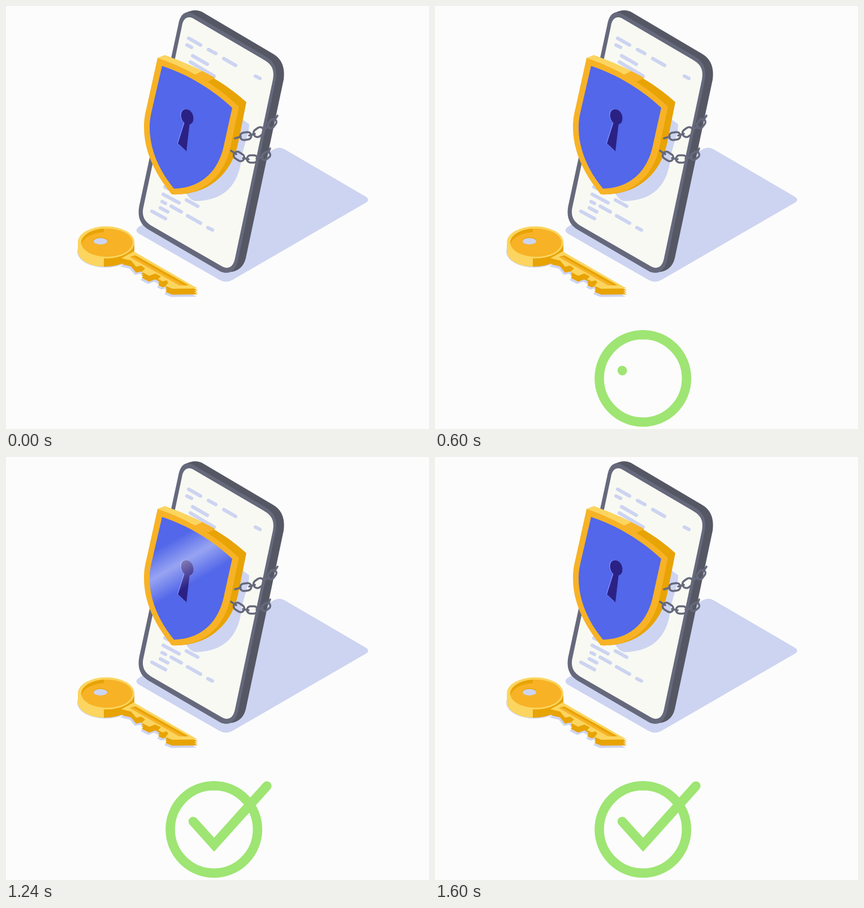
These frames come from a looping animation (748 by 748 pixels, 9.96 s). An HTML page:

```html
<!DOCTYPE html>
<html lang="en">
<head>
<meta charset="utf-8">
<title>Secured phone</title>
<style>
  html, body { margin: 0; width: 100%; height: 100%; overflow: hidden; background: #fcfcfc; }
  svg { display: block; width: 100vw; height: 100vh; }
  .pale { fill: #cdd4f1; }
  .gold { fill: #f7b226; }
  .dark { fill: #e8a305; }
  .light { fill: #fbd55f; }
  .lines { fill: none; stroke: #cdd4f1; stroke-width: 6.2; stroke-linecap: round; }
  .chain { fill: none; stroke: #66697b; stroke-width: 3.6; stroke-linecap: round; }
  .green { fill: none; stroke: #9ee573; stroke-width: 16.6; }
</style>
</head>
<body>
<svg viewBox="0 0 748 748">
  <defs>
    <path id="face" d="M276 106C322 121 366 148 400 180L386 243C377 292 345 322 297 323C270 290 254 253 254 214C254 202 256 193 258 184Z"/>
    <clipPath id="faceClip"><use href="#face"/></clipPath>
    <linearGradient id="glow" x2="0" y2="1">
      <stop offset="0" stop-color="#fff" stop-opacity="0"/>
      <stop offset=".5" stop-color="#fff" stop-opacity=".4"/>
      <stop offset="1" stop-color="#fff" stop-opacity="0"/>
    </linearGradient>
    <path id="blade" d="M226 434L339 499.500L294 500L282 495L287 489L284 485L277 487L269 483L274 478L264 473L253 477L240 470L246 464L239 459L230 461L226 456L221 450L204 446Z"/>
    <ellipse id="bow" cx="177" cy="418" rx="50" ry="28.500"/>
    <g id="keyhole">
      <ellipse cx="320.500" cy="196" rx="10.500" ry="14" transform="rotate(-22 320.500 196)"/>
      <path d="M316 205L304 243L319 257L325 206Z"/>
    </g>
  </defs>

  <path class="pale" d="M234 402Q227 397 234 391L474 253Q483 248 492 253L636 337Q645 343 636 348L401 484Q389 491 377 484Z"/>

  <!-- phone -->
  <path fill="#555864" d="M318 12Q334 4 346 10L473 85Q495 98 491 130L424 446Q419 466 400 470L385 471Z"/>
  <path fill="#66697c" d="M304.500 34C308 14 317 7 331 14L458 88.500C474 98 480 108 477 130L411 446C407 467 397 476 380 470L253 396C238 387 232 374 235.500 354Z"/>
  <path fill="#f8f9f3" d="M311 36C313 22 321 17 331 22L455 94.500C470 103 475 112 472 130L405 446C402 461 394 466 383 461L258 389C246 382 240 373 242.500 358Z"/>
  <path class="lines" d="M323 57l21 12M320 69l8 4M358 77l13 7M385 93l21 12M441 124l8 4M330 88l26 15M326 99l42 25M281 320l6 3M278 333l28 15M319 343l20 11M276 346l6 3M292 354l18 10M273 357l13 7M258 363l24 13M321 371l23 13M357 392l8 4"/>
  <path class="pale" d="M318 330Q326 345 336 345C386 344 413 316 417 264C424 237 430 225 430 209L416 199Z"/>

  <!-- shield -->
  <path class="dark" d="M281 87C335 108 385 133 425 170L411 240C400 296 358 336 293 333Z"/>
  <path class="gold" d="M268 92L281 87Q330 105 370 127L357 134Z"/>
  <path class="light" d="M268 92L281 87Q320 101 347 115L333 122Z"/>
  <path class="gold" d="M268 92C322 110 372 140 412 178L398 244C388 301 348 336 293 333C262 295 244 256 244 214C244 200 246 190 249 178Z"/>
  <use href="#face" fill="#5267e9"/>
  <use href="#keyhole" x="-1.300" y="-.5" fill="#8291ff"/>
  <use href="#keyhole" fill="#2b2185"/>
  <g clip-path="url(#faceClip)">
    <rect id="shine" width="400" height="84" fill="url(#glow)" transform="rotate(-30)"/>
  </g>

  <g class="chain">
    <path d="M405 234L415 231M430 229L440 226M455 219L465 213M474 203L480 194M398 256L407 262M419 269L429 271M443 270L454 267M464 259L467 252"/>
    <rect x="414" y="223.500" width="20" height="13" rx="6.500" transform="rotate(-8 424 230)"/>
    <rect x="437" y="216" width="20" height="14" rx="7" transform="rotate(-35 447 223)"/>
    <rect x="461.500" y="202.500" width="18" height="11" rx="5.500" transform="rotate(-52 470.500 208)"/>
    <rect x="402" y="259.500" width="20" height="13" rx="6.500" transform="rotate(34 412 266)"/>
    <rect x="426" y="264" width="19" height="13" rx="6.500"/>
    <rect x="451" y="259.500" width="17" height="11" rx="5.500" transform="rotate(-38 459.500 265)"/>
  </g>

  <!-- key -->
  <g class="pale">
    <use href="#bow" x="-1" y="16"/>
    <use href="#blade" x="-2" y="14.500"/>
  </g>
  <g class="dark">
    <use href="#blade" y="10.500"/><use href="#blade" y="7"/><use href="#blade" y="3.500"/>
    <path d="M173 430L227 418V433C226 449 202 461 173 461Z"/>
  </g>
  <path class="light" d="M127 418V433C127 449 148 461 173 461V430Z"/>
  <use class="light" href="#blade"/>
  <use class="light" href="#bow"/>
  <path class="dark" d="M229 441L323 494L311 494L220 443Z"/>
  <path class="gold" d="M225 443L315 494L306 494L219 444Z"/>
  <ellipse class="gold" cx="178.500" cy="418.500" rx="45.500" ry="25"/>
  <path class="dark" d="M133 422C131 407 149 395 173 393.500V400C153 401 137 409 133 422Z"/>
  <ellipse class="dark" cx="167" cy="415.300" rx="12.500" ry="6.300"/>
  <ellipse class="pale" cx="167" cy="416" rx="12" ry="5.700"/>

  <!-- confirmation -->
  <path id="ring" class="green" pathLength="1" d="M367.700 581.300a77.200 77.200 0 0 1 0 154.400a77.200 77.200 0 0 1 0-154.400"/>
  <path id="tick" class="green" stroke-linecap="round" stroke-miterlimit="10"/>
</svg>
<script>
  const LOOP = 9960;
  const [ring, tick, shine] = ["ring", "tick", "shine"].map(id => document.getElementById(id));
  const points = [[331, 644.5], [368, 685.5], [461.3, 581.7]];
  const clamp = v => Math.max(0, Math.min(1, v));
  const dist = (a, b) => Math.hypot(b[0] - a[0], b[1] - a[1]);
  const lerp = (a, b, k) => a.map((v, i) => v + (b[i] - v) * k);
  const first = dist(points[0], points[1]);
  const total = first + dist(points[1], points[2]);

  // Path of the tick up to the share p of its length
  function tickPath(p) {
    const run = p * total;
    const [a, b, c] = points;
    if (run <= first) return `M${a}L${lerp(a, b, Math.max(run, 0.01) / first)}`;
    return `M${a}L${b}L${lerp(b, c, (run - first) / (total - first))}`;
  }

  function draw(t) {
    const p = clamp(t / 510);
    ring.style.display = p > 0.002 ? "" : "none";
    ring.setAttribute("stroke-dasharray", p < 1 ? `${p} 2` : "none");
    tick.style.display = t >= 595 ? "" : "none";
    tick.setAttribute("d", tickPath(clamp((t - 600) / 400)));
    shine.setAttribute("y", 274 + 0.65 * (t - 1240));
  }

  const start = performance.now();
  function frame() {
    draw((performance.now() - start) % LOOP);
    requestAnimationFrame(frame);
  }
  frame();
</script>
</body>
</html>
```
